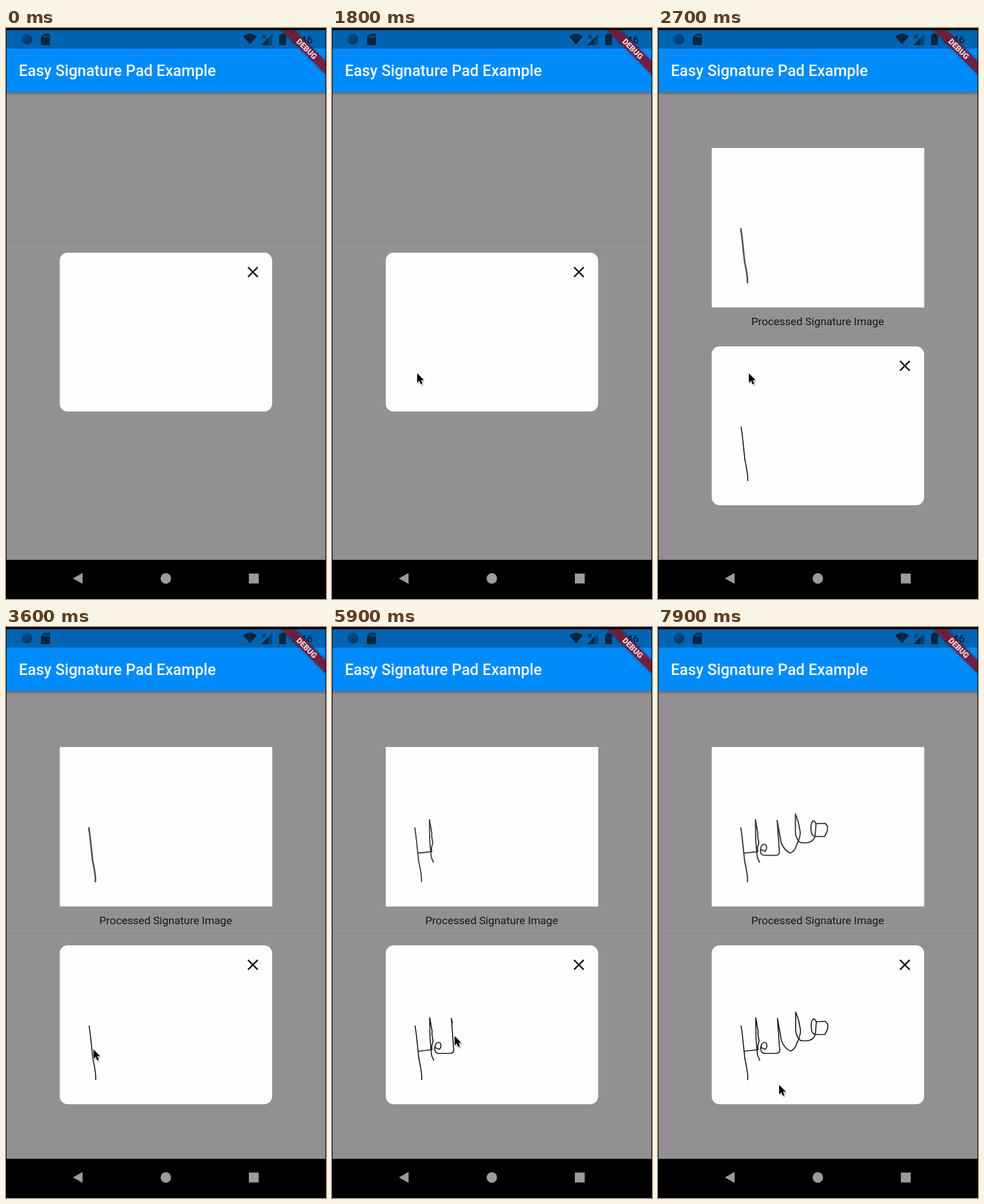
An HTML page for the animation above (8000 ms loop, 560x999 px).

```html
<!DOCTYPE html>
<html lang="en">
<head>
<meta charset="utf-8">
<style>
  html, body { margin: 0; width: 100%; height: 100%; overflow: hidden; background: #000; }
  svg { display: block; width: 100%; height: 100%; }
  text { font-family: Roboto, sans-serif; }
  .ink path, #thumb path { fill: none; stroke-linecap: round; stroke-linejoin: round; }
  .ink path { stroke: #0c0b0f; stroke-width: 1.7; }
</style>
</head>
<body>
<svg viewBox="0 0 560 999">
  <defs>
    <linearGradient id="shade" x2="0" y2="1">
      <stop offset="0" stop-color="#000" stop-opacity=".3"/>
      <stop offset="1" stop-color="#000" stop-opacity="0"/>
    </linearGradient>
    <linearGradient id="ball" x2="1" y2="1">
      <stop offset="0" stop-color="#00528f"/>
      <stop offset="1" stop-color="#04325c"/>
    </linearGradient>
    <filter id="soft" x="-50%" y="-50%" width="200%" height="200%"><feGaussianBlur stdDeviation="1.3"/></filter>
    <filter id="glow" x="-20%" y="-60%" width="140%" height="220%"><feGaussianBlur stdDeviation="2.5"/></filter>
    <clipPath id="screen"><rect x="1" y="4" width="558" height="926"/></clipPath>
    <path id="arrow" d="M0 0V16.5L3.9 13L6.4 19.2L9.3 18L6.8 12H11.8Z"/>
  </defs>

  <rect width="560" height="999"/>
  <rect x="1" y="36" width="558" height="894.500" fill="#929093"/>
  <rect x="1" y="112" width="558" height="6" fill="url(#shade)"/>
  <rect x="1" y="36" width="558" height="76" fill="#008bfb"/>
  <rect x="1" y="4" width="558" height="32" fill="#0064b3"/>
  <text x="22.500" y="84" font-size="27.100" font-weight="500" fill="#f4faff">Easy Signature Pad Example</text>

  <g fill="#08263f">
    <circle cx="36.500" cy="19.500" r="9.500" fill="url(#ball)"/>
    <path d="M67 10H75Q77 10 77 12V28Q77 30 75 30H63Q61 30 61 28V16Z"/>
    <path d="M67 13v4M70.500 13v4M74 13v4" stroke="#0064b3" stroke-width="1.700"/>
    <path d="M427 29L415 14.500Q427 5.500 439 14.500Z"/>
    <path d="M466 10V30H447Z" opacity=".5"/>
    <path d="M459 17.500V30H447Z"/>
    <path d="M448 11.500l7 7m0-7l-7 7" stroke="#08263f" stroke-width="1.500"/>
    <path d="M481 12V10H487V12H490V30H478V12Z"/>
    <text x="499.500" y="26.500" font-size="19" font-weight="500">5:46</text>
  </g>

  <g clip-path="url(#screen)">
    <g transform="translate(559 4) rotate(45)">
      <rect x="-60" y="38" width="120" height="16.300" filter="url(#glow)" opacity=".45"/>
      <rect x="-60" y="38" width="120" height="16.300" fill="#7b1c3a" opacity=".9"/>
      <text y="51" font-size="13.800" font-weight="900" text-anchor="middle" fill="#e9dfe4">DEBUG</text>
    </g>
  </g>

  <g id="result">
    <rect x="94" y="210" width="372" height="279" fill="#fefdff"/>
    <g id="thumb" transform="translate(-.5 -346.500)"></g>
    <text x="279.500" y="520" font-size="19" text-anchor="middle" fill="#19181b">Processed Signature Image</text>
  </g>

  <g id="pad">
    <path d="M1 535.500H559" stroke="#858386"/>
    <rect x="94" y="557" width="371.700" height="278" rx="14" fill="#fefdff"/>
    <path d="M423.500 582.500l17 17m0-17l-17 17" stroke="#17161a" stroke-width="2.700"/>
    <g class="ink" id="ink"></g>
  </g>

  <g fill="#9b9b9b">
    <path d="M117 963L134 953.500V972.500Z"/>
    <circle cx="279.700" cy="963" r="9.200"/>
    <rect x="425" y="954.500" width="17.300" height="17.300"/>
  </g>

  <g id="cursor">
    <use href="#arrow" x="1.500" y="2.500" opacity=".4" filter="url(#soft)"/>
    <use href="#arrow" stroke="#fff" stroke-width="1.400" paint-order="stroke"/>
  </g>
</svg>
<script>
const LOOP = 8000, STEP = 100, LAG = 100, RISE = 164;
const $ = id => document.getElementById(id);

// Pen strokes in the pad's lowered position, each with its start and end time.
const strokes = [
  [2300, 2550, 'M145.500 698L147 709L148 717L152 755L155 770L157 784V792'],
  [3750, 4650, 'M152 742L162 741L175 739.500L174.500 733L177 724L175 714V706L171 683.500L171.500 718L173 738L174.500 750L178 758'],
  [5200, 6800, 'M181 736L188 739Q192 735 190 729Q187 724 182 729Q178 736 181 743Q183 746 188 746H206Q213 746 213 740L211 713L209 684.500L213 707L216 724Q222 738 232 742Q240 739 243 728Q251 712 249 703L246 688L241 673.500V707Q244 723 252 724H261Q276 722 276 706L277 691'],
  [6800, 7300, 'M277 691Q275 685 271 686Q267 692 268.500 703Q269 712 276 713H292L297 703V695L293 690L278 690.500']
];
// Cursor positions between strokes: time, x, y.
const moves = [
  [100, 243, 558], [200, 244, 566], [400, 242, 570], [700, 236, 568], [1400, 164, 568],
  [1800, 149, 604], [2200, 145, 534], [2300, 145, 534],
  [2550, 157, 628], [2700, 159, 604], [3200, 153, 712], [3600, 153, 739], [3750, 152, 742],
  [4650, 178, 758], [4900, 189, 742], [5200, 181, 736],
  [7300, 278, 690], [7500, 272, 716], [7900, 212, 801]
];
// When the processed image refreshes, and how many strokes and what line it shows.
const snaps = [
  [2700, 1, 2.8, '#504e54'],
  [4800, 2, 1.9, '#37353a'],
  [7500, 4, 2.1, '#39373c']
];

const clamp = v => Math.min(1, Math.max(0, v));

function addPath(parent, d) {
  const p = document.createElementNS('http://www.w3.org/2000/svg', 'path');
  p.setAttribute('d', d);
  return parent.appendChild(p);
}

const lines = strokes.map(([from, to, d]) => {
  const ink = addPath($('ink'), d);
  return { from, to, ink, copy: addPath($('thumb'), d), len: ink.getTotalLength() };
});

const progress = (s, t) => clamp((t - s.from) / (s.to - s.from));

function cursorAt(t, lift) {
  const s = lines.find(s => t >= s.from && t < s.to);
  if (s) {
    const p = s.ink.getPointAtLength(progress(s, t) * s.len);
    return [p.x, p.y - lift];
  }
  const i = moves.findIndex(m => m[0] > t);
  if (i < 0) return moves[moves.length - 1].slice(1);
  const [t0, x0, y0] = moves[i - 1], [t1, x1, y1] = moves[i];
  const k = (t - t0) / (t1 - t0);
  return [x0 + (x1 - x0) * k, y0 + (y1 - y0) * k];
}

function show(el, on) { el.style.display = on ? '' : 'none'; }

function render(time) {
  const t = Math.floor(time / STEP) * STEP;
  const snap = snaps.filter(s => t >= s[0]).pop();
  const lift = snap ? 0 : RISE;

  show($('result'), snap);
  $('pad').setAttribute('transform', `translate(0 ${-lift})`);
  lines.forEach((s, i) => {
    const k = progress(s, t - LAG);
    show(s.ink, k > 0);
    s.ink.style.strokeDasharray = k < 1 ? `${k * s.len} ${s.len * 2}` : 'none';
    show(s.copy, snap && i < snap[1]);
  });
  if (snap) {
    $('thumb').style.strokeWidth = snap[2];
    $('thumb').style.stroke = snap[3];
  }

  show($('cursor'), t >= moves[0][0]);
  if (t >= moves[0][0]) {
    $('cursor').setAttribute('transform', `translate(${cursorAt(t, lift)})`);
  }
}

const start = performance.now();
function tick() {
  render((performance.now() - start) % LOOP);
  requestAnimationFrame(tick);
}
tick();
</script>
</body>
</html>
```
